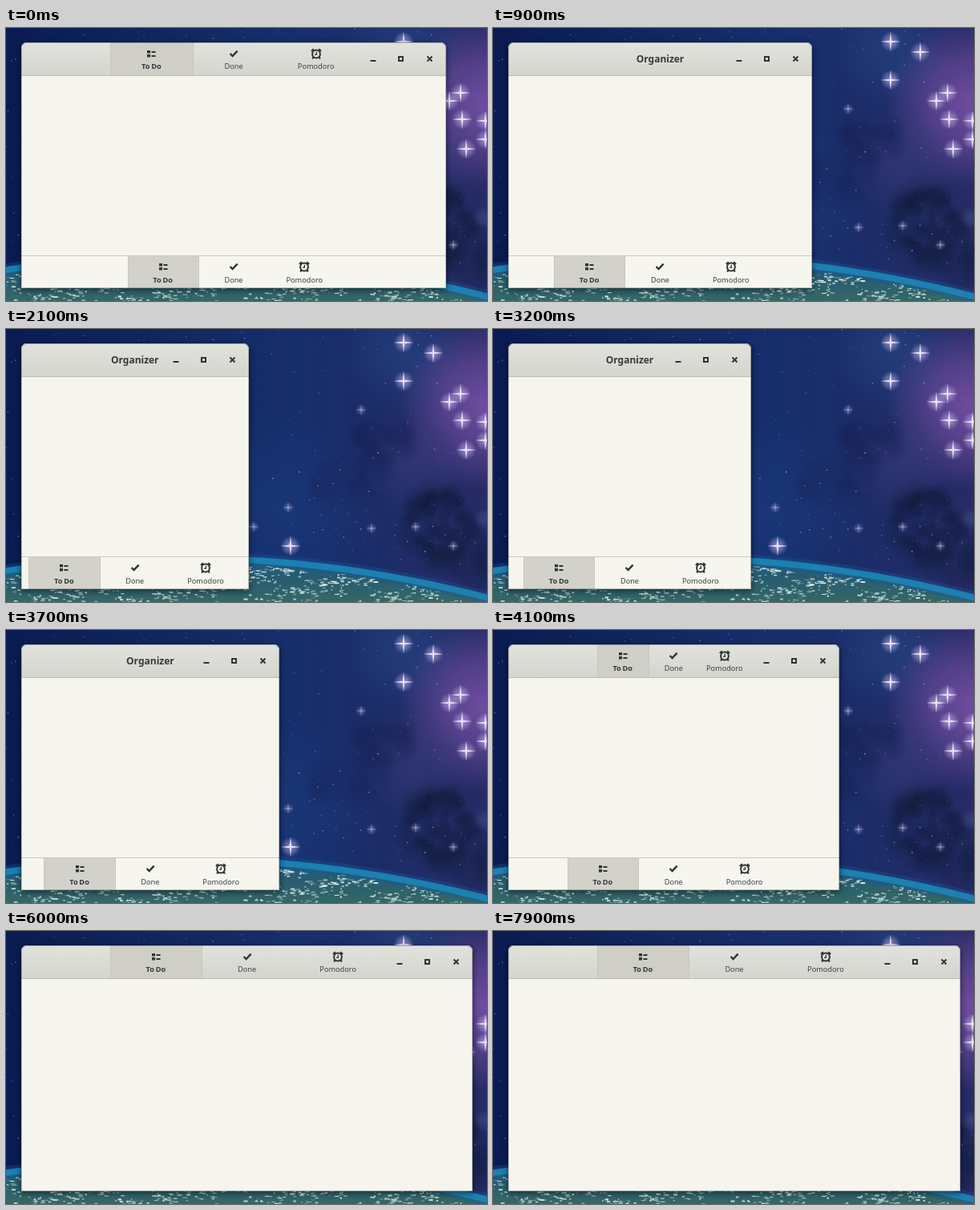
Animation of 600x341 px, one loop 8000 ms. Source, as an HTML page with a canvas:

```html
<!DOCTYPE html>
<html lang="en">
<head>
<meta charset="utf-8">
<title>Adaptive view switcher</title>
<style>
  html, body { margin: 0; width: 100%; height: 100%; overflow: hidden; background: #0c1d55; }
  body { position: relative; font: 9.2px "Noto Sans", sans-serif; color: #3a4042; }
  canvas { position: absolute; left: 0; top: 0; }
  #window {
    position: absolute; left: 19px; top: 18px; height: 307px;
    border-radius: 7px 7px 0 0; background: #f5f5ed;
    box-shadow: 0 2px 7px 1px rgba(0,0,0,.45);
    overflow: hidden;
  }
  #window::after {
    content: ""; position: absolute; inset: 0; border-radius: inherit;
    box-shadow: inset 0 0 0 1px rgba(30,42,66,.3);
  }
  header {
    position: relative; height: 41px; border-bottom: 1px solid #bdbdb6;
    background: linear-gradient(#e2e2dd, #d5d5cf);
  }
  #title {
    position: absolute; inset: 0; text-align: center;
    font-size: 12px; font-weight: 700; line-height: 41px; color: #34393b;
  }
  .switcher { display: flex; }
  header .switcher { position: absolute; left: 111px; right: 111px; height: 41px; }
  .tab { flex: 1; position: relative; text-align: center; white-space: nowrap; }
  .tab svg { position: absolute; left: 50%; top: 7px; margin-left: -7px; color: #2e3436; }
  .tab span { position: absolute; left: 0; right: 0; top: 23px; line-height: 14px; }
  .active { background: #cfcfc8; box-shadow: inset 1px 0 #c8c8c1, 1px 0 #c8c8c1; }
  .active span { font-weight: 700; word-spacing: -.6px; color: #34393b; }
  #controls { position: absolute; right: 0; top: 0; }
  #bar {
    position: absolute; left: 0; right: 0; bottom: 0; height: 40px;
    border-top: 1px solid #c9c9c2; background: #f6f6ee;
  }
  #bar .switcher { width: 265px; height: 40px; margin: 0 auto; }
  #bar .tab svg { top: 6px; }
  #bar .active { background: #d2d2ca; }
</style>
</head>
<body>
<canvas id="sky" width="600" height="341"></canvas>
<div id="window">
  <header>
    <div id="title">Organizer</div>
    <div class="switcher"></div>
    <svg id="controls" width="111" height="41" fill="none" stroke="#2e3436" stroke-width="2">
      <path d="M16.5 23h7M52 18h5v5h-5zM87.5 17.5l6 6m0-6l-6 6"/>
    </svg>
  </header>
  <div id="bar"><div class="switcher"></div></div>
</div>
<script>
const $ = selector => document.querySelector(selector);

const tabs = [
  ["To Do", '<path fill="currentColor" d="M2 3h4v3.5H2zM2 8h4v3.5H2zM7.5 4h5v2h-5zM7.5 9h5v2h-5z"/>'],
  ["Done", '<path stroke="currentColor" stroke-width="2.4" d="M2.6 7l3 3L11.6 3.6"/>'],
  ["Pomodoro", '<g stroke="currentColor"><circle cx="7" cy="7.5" r="4.9" stroke-width="2"/>' +
    '<path stroke-width="2.2" d="M.9 4l3-2.8M13.1 4l-3-2.8M3.6 11.4l-1.5 2M10.4 11.4l1.5 2"/>' +
    '<path stroke-width="1.3" d="M7.4 4.8v3.3H5"/></g>']
];
for (const switcher of document.querySelectorAll(".switcher"))
  switcher.innerHTML = tabs.map(([label, icon], i) =>
    `<div class="tab${i ? "" : " active"}"><svg width="14" height="14" fill="none">${icon}</svg><span>${label}</span></div>`
  ).join("");

// Sky
const ctx = $("#sky").getContext("2d");
let seed = 7;
const random = () => (seed = seed * 16807 % 2147483647) / 2147483647;
const between = (low, high) => low + (high - low) * random();
const horizon = x => 283 + (x - 218) ** 2 / 2950;

function blob(x, y, radius, rgb, alpha) {
  const glow = ctx.createRadialGradient(x, y, 0, x, y, radius);
  glow.addColorStop(0, `rgba(${rgb},${alpha})`);
  glow.addColorStop(.5, `rgba(${rgb},${alpha * .6})`);
  glow.addColorStop(1, `rgba(${rgb},0)`);
  ctx.fillStyle = glow;
  ctx.fillRect(x - radius, y - radius, radius * 2, radius * 2);
}

function cloud(x, y, width, height, rgb, alpha) {
  for (let i = 0; i < 70; i++) {
    const angle = between(0, 2 * Math.PI), reach = Math.sqrt(random());
    blob(x + Math.cos(angle) * reach * width, y + Math.sin(angle) * reach * height,
      between(6, 22), rgb, alpha);
  }
}

function star(x, y, size, alpha) {
  blob(x, y, size, "195,180,235", alpha * .65);
  ctx.fillStyle = `rgba(230,222,242,${alpha})`;
  ctx.beginPath();
  for (let i = 0; i < 8; i++) {
    const radius = i % 2 ? size * .14 : size, angle = i * Math.PI / 4;
    ctx.lineTo(x + Math.cos(angle) * radius, y + Math.sin(angle) * radius);
  }
  ctx.fill();
}

function traceHorizon(offset = 0) {
  ctx.beginPath();
  for (let x = -10; x <= 610; x += 10) ctx.lineTo(x, horizon(x) + offset);
}

function paintSky() {
  const base = ctx.createLinearGradient(0, 0, 600, 0);
  ["#0a1b52", "#0e2359", "#122962", "#162f6c", "#1d2c68", "#272b66"]
    .forEach((color, i) => base.addColorStop(i / 5, color));
  ctx.fillStyle = base;
  ctx.fillRect(0, 0, 600, 341);

  blob(340, 225, 120, "28,60,128", .55);
  blob(500, 25, 80, "38,76,140", .5);
  blob(595, 95, 105, "124,82,168", .85);
  blob(510, 165, 70, "58,58,124", .6);
  cloud(470, 140, 38, 26, "20,30,80", .1);
  cloud(430, 190, 50, 30, "20,32,84", .09);
  cloud(540, 245, 44, 46, "12,22,48", .22);
  cloud(580, 285, 40, 30, "16,30,66", .14);
  blob(597, 237, 14, "56,72,122", .8);

  for (let i = 0; i < 260; i++) {
    ctx.fillStyle = `rgba(185,205,245,${between(.1, .75)})`;
    const size = between(.5, 1.6);
    ctx.fillRect(between(0, 600), between(0, 300), size, size);
  }
  const brightStars = [[496, 17], [533, 30], [496, 65], [553, 91], [567, 81], [569, 114],
    [574, 151], [598, 116], [598, 139], [355, 271]];
  const faintStars = [[309, 247], [352, 223], [558, 271], [511, 247], [456, 249], [443, 101]];
  for (const [x, y] of brightStars) star(x, y, 12.5, 1);
  for (const [x, y] of faintStars) star(x, y, 7, .5);

  // Planet
  traceHorizon();
  ctx.lineTo(610, 350);
  ctx.lineTo(-10, 350);
  const ground = ctx.createLinearGradient(0, 283, 0, 341);
  ["#1f5c84", "#285c70", "#346866"].forEach((color, i) => ground.addColorStop(i / 2, color));
  ctx.fillStyle = ground;
  ctx.fill();
  for (const [width, color] of [[16, "rgba(22,90,150,.35)"], [8, "rgba(28,134,186,.85)"]]) {
    traceHorizon(3);
    ctx.strokeStyle = color;
    ctx.lineWidth = width;
    ctx.stroke();
  }

  for (let i = 0; i < 2600; i++) {
    const x = between(0, 600), y = between(284, 341);
    const density = .4 + .35 * Math.sin(x / 23 + y / 6) + .25 * Math.sin(x / 9 - y / 4);
    if (y < horizon(x) + 9 || random() > density) continue;
    ctx.fillStyle = `rgba(222,238,230,${between(.25, 1)})`;
    ctx.fillRect(x, y, between(1, 6), between(.8, 2.2));
  }
}
paintSky();

// Drag of the right window edge: [tenths of a second, x]
const drag = [[0, 549], [4, 549], [5, 500], [9, 398], [12, 371], [21, 302.5], [31, 302.5],
  [32, 322], [40, 352], [41, 431.5], [43, 431.5], [52, 494], [60, 582], [63, 582],
  [65, 560], [68, 582], [80, 583]];

function rightEdge(tick) {
  const next = drag.findIndex(([time]) => time > tick);
  const [t0, x0] = drag[next - 1], [t1, x1] = drag[next];
  return x0 + (x1 - x0) * (tick - t0) / (t1 - t0);
}

function render() {
  const right = rightEdge(Math.floor(performance.now() % 8000 / 100));
  const wide = right > 420;
  const barShown = Math.min(1, Math.max(0, (580 - right) / 20));
  $("#window").style.width = right - 19 + "px";
  $("#title").style.display = wide ? "none" : "block";
  $("header .switcher").style.display = wide ? "flex" : "none";
  $("#bar").style.transform = `translateY(${(1 - barShown) * 41}px)`;
  requestAnimationFrame(render);
}
render();
</script>
</body>
</html>
```
